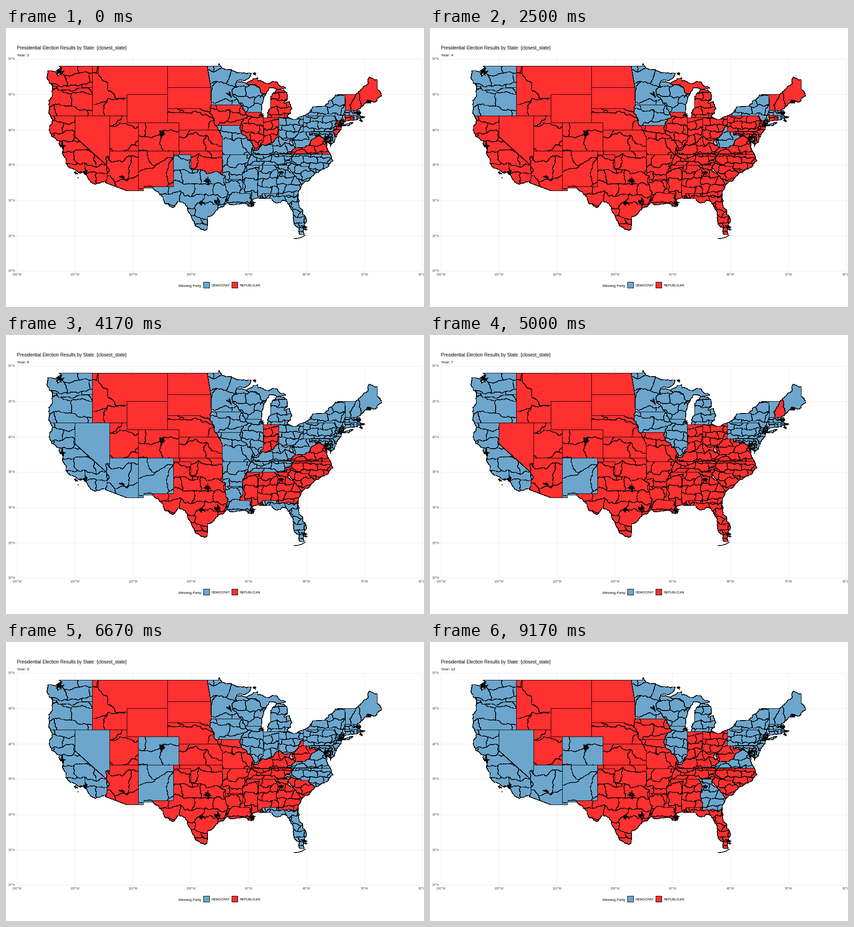
A matplotlib script for the animation above (10 s loop, 917 px wide and 611 px high).

```python
import math
import random

import matplotlib.pyplot as plt
import numpy as np
from matplotlib.animation import FuncAnimation
from matplotlib.patches import Polygon, Rectangle

W, H, DPI = 917, 611, 100
BLUE, RED = "#6CA6CD", "#FF3030"
LOOP_MS, FRAMES = 10000, 200
PX = 72 / DPI
INK = dict(color="black", lw=0.5 * PX, antialiased=False)

plt.rcParams["font.family"] = "Liberation Sans"
plt.rcParams["path.snap"] = False
fig = plt.figure(figsize=(W / DPI, H / DPI), dpi=DPI, facecolor="white")
ax = fig.add_axes([0, 0, 1, 1])
ax.set_xlim(-0.5, W - 0.5)
ax.set_ylim(H - 0.5, -0.5)
ax.axis("off")

# Blue states of the first election, then the states that change sides at each later one
SWINGS = (
    "MN WI MO AR LA TX MS AL GA FL SC NC TN KY WV OH PA NY MA RI MD DE",
    "WI MO AR LA TX MS AL FL SC NC TN KY OH PA MA DE",
    "NY GA WV MD RI",
    "WA OR IA WI NY MA RI WV",
    "CA NV MT CO NM MO AR LA IL MI OH KY TN GA PA NJ CT VT NH ME MD DE",
    "MT CO GA AZ FL",
    "NV AZ MO AR LA OH KY TN FL WV NH",
    "NM IA NH",
    "NV CO NM IA IN OH VA NC FL",
    "IN NC",
    "IA WI MI OH PA FL",
    "AZ GA MI PA WI")
blue_by_year = [set()]
for swing in SWINGS:
    blue_by_year.append(blue_by_year[-1] ^ set(swing.split()))
blue_by_year.pop(0)


def text(x, y, s, px, color="black", **kw):
    return ax.text(x, y, s, fontsize=px * PX, color=color, **kw)


def split(a, b, rng):
    """Midpoint displacement between two points, without the end point."""
    dx, dy = b[0] - a[0], b[1] - a[1]
    if math.hypot(dx, dy) < 3:
        return [a]
    k = rng.uniform(-0.2, 0.2)
    mid = ((a[0] + b[0]) / 2 - k * dy, (a[1] + b[1]) / 2 + k * dx)
    return split(a, mid, rng) + split(mid, b, rng)


def edge(a, b):
    """Surveyed borders stay straight; the rest are rough, alike from both sides."""
    dx, dy = abs(b[0] - a[0]), abs(b[1] - a[1])
    if min(dx, dy) <= 1 or math.hypot(dx, dy) > 45:
        return [a]
    lo, hi = sorted((a, b))
    pts = split(lo, hi, random.Random(f"{lo}{hi}")) + [hi]
    return pts[:-1] if a == lo else pts[:0:-1]


states = []


def state(name, step, *coords):
    """Add a state over its neighbours; step is the spacing of its districts."""
    pts = list(zip(coords[::2], coords[1::2]))
    outline = [p for a, b in zip(pts, pts[1:] + pts[:1]) for p in edge(a, b)]
    patch = Polygon(outline, facecolor=RED, edgecolor="black", lw=INK["lw"],
                    antialiased=False, zorder=1)
    ax.add_patch(patch)
    states.append((name, step, patch))


def box(name, step, x0, y0, x1, y1):
    state(name, step, x0, y0, x1, y0, x1, y1, x0, y1)


def districts(index):
    """Brick-like net of rough lines over the visible part of a state."""
    name, step, patch = states[index]
    rng = random.Random(name)
    extent = patch.get_path().get_extents()
    cols, rows = int(extent.width / step) + 3, int(extent.height / step) + 3
    nodes = {(i, j): (extent.x0 + (i - 0.6 + rng.uniform(-0.3, 0.3)) * step,
                      extent.y0 + (j - 0.6 + rng.uniform(-0.3, 0.3)) * step)
             for i in range(cols) for j in range(rows)}
    net = []
    for (i, j), p in nodes.items():
        for q in [(i + 1, j), (i, j + 1)][:1 + (i + j) % 2]:
            if q in nodes:
                net += split(p, nodes[q], rng) + [nodes[q], (np.nan, np.nan)]
    net = np.array(net)
    visible = patch.get_path().contains_points(net)
    for _, _, cover in states[index + 1:]:
        visible &= ~cover.get_path().contains_points(net)
    net[~visible] = np.nan
    ax.plot(*net.T, zorder=2, **INK)


def scribble(x, y, r):
    """Tangle of tiny city districts or islets."""
    rng = random.Random(f"{x} {y}")
    pts = [(x + rng.gauss(0, r / 2), y + rng.gauss(0, r / 2)) for _ in range(4 + 2 * r)]
    ax.plot(*zip(*pts), zorder=3, **INK)


for k in range(8):
    x = 24 + 127 * k
    ax.plot([x, x], [68, 532], color="#EBEBEB", lw=0.5 * PX, antialiased=False, zorder=0)
    text(x, 539.5, f"{130 - 10 * k}°W", 7, "#4D4D4D", ha="center", va="center")
for k in range(7):
    y = round(68 + 77.4 * k)
    ax.plot([24, 913], [y, y], color="#EBEBEB", lw=0.5 * PX, antialiased=False, zorder=0)
    text(20, y + 0.5, f"{50 - 5 * k}°N", 7, "#4D4D4D", ha="right", va="center")

# Later states cover earlier ones, so a shared border is shaped by the later one.
# West
box("MT", 0, 189, 83, 354, 156)
state("CA", 24, 97,192, 101,200, 95,216, 104,239, 119,258, 127,280, 143,307, 166,316, 175,320,
      188,338, 218,336, 240,320, 227,192)
state("WA", 29, 116,83, 189,83, 189,140, 101,140, 101,127, 91,93, 112,97, 113,106, 119,100)
state("OR", 36, 189,130, 160,131, 136,135, 115,136, 110,127, 101,127, 99,152, 94,182, 97,192, 189,192)
state("ID", 60, 189,83, 202,83, 202,100, 223,120, 222,136, 240,154, 265,153, 265,192, 189,192)
box("UT", 50, 227, 192, 290, 269)
box("WY", 0, 265, 145, 354, 207)
box("CO", 45, 290, 207, 379, 269)
state("NV", 0, 151,192, 227,192, 227,281, 218,283, 220,300, 151,238)
state("AZ", 40, 227,269, 290,269, 290,356, 265,356, 217,338, 221,331, 221,318, 226,311,
      220,300, 218,283, 227,281)
state("NM", 55, 290,269, 367,269, 367,347, 322,347, 322,350, 301,350, 301,356, 290,356)

# Plains and Mississippi
box("ND", 0, 354, 83, 452, 130)
box("SD", 0, 354, 130, 460, 186)
state("NE", 60, 354,176, 424,176, 449,185, 470,223, 379,223, 379,207, 354,207)
box("KS", 48, 379, 223, 480, 269)
state("TX", 25, 367,277, 470,277, 492,345, 483,382, 465,394, 442,412, 441,440, 416,433, 401,404,
      387,381, 376,379, 365,393, 348,384, 343,368, 322,347, 367,347)
state("OK", 34, 367,269, 474,269, 475,322, 440,319, 405,306, 405,277, 367,277)
state("MN", 34, 441,83, 466,83, 467,77, 473,87, 514,97, 538,99, 505,118, 530,130, 530,168,
      450,168, 449,130)
state("IA", 31, 450,168, 530,168, 535,213, 459,213, 454,196, 447,173)
state("MO", 26, 459,213, 535,213, 545,262, 545,277, 536,285, 527,285, 531,277, 474,277, 474,238, 465,223)
state("AR", 31, 474,277, 531,277, 527,285, 545,285, 535,331, 481,331, 481,324, 475,322)
state("LA", 22, 481,331, 535,331, 535,362, 538,374, 543,390, 509,385, 483,382, 487,359, 481,347)

# South
state("TN", 15, 538,277, 637,275, 620,300, 528,300)
state("MS", 24, 528,300, 560,300, 560,360, 552,372, 538,374, 535,362, 512,362, 519,343, 518,317)
state("AL", 20, 555,300, 600,300, 600,362, 562,362, 564,373, 552,372, 551,348)
state("FL", 15, 562,362, 640,362, 642,380, 651,402, 658,425, 653,452, 645,452, 631,424, 625,396,
      607,376, 593,383, 583,373, 564,373)
state("SC", 17, 617,290, 665,295, 677,318, 669,328, 647,346, 630,330, 610,303)
state("GA", 17, 588,300, 620,300, 617,306, 633,323, 647,346, 641,362, 632,372, 597,367, 593,332)
state("NC", 14, 637,275, 711,276, 717,290, 703,305, 677,318, 663,303, 648,303, 630,297, 604,300, 620,288)
state("KY", 18, 540,262, 564,245, 598,230, 620,240, 634,262, 612,275, 538,277)

# Great Lakes
state("WI", 22, 505,118, 527,121, 557,133, 562,144, 557,152, 570,141, 561,165, 560,184, 524,184,
      517,168, 497,149, 495,136)
state("MI", 0, 527,121, 552,108, 552,116, 576,122, 595,118, 613,130, 576,132, 562,144, 557,133)
state("MI", 16, 573,196, 580,176, 580,151, 599,134, 616,142, 617,155, 609,164, 621,160, 627,176, 616,196)
state("IL", 18, 524,184, 560,184, 564,196, 564,247, 551,267, 543,269, 529,245, 514,224, 518,204, 529,195)
state("IN", 17, 564,196, 598,196, 598,237, 587,249, 557,257, 564,247)
state("OH", 14, 598,196, 637,199, 652,192, 652,213, 640,245, 617,244, 598,237)

# Northeast
state("WV", 24, 652,213, 652,227, 665,227, 666,235, 687,233, 673,242, 655,261, 634,262, 626,247, 637,235)
state("VA", 15, 612,275, 711,276, 704,254, 696,240, 687,233, 673,242, 655,261, 634,262)
state("MD", 10, 665,227, 715,227, 720,248, 711,260, 707,233, 704,254, 696,240, 687,233, 666,235)
state("DE", 0, 712,227, 717,226, 721,247, 714,247)
state("PA", 13, 652,192, 662,187, 662,192, 718,192, 726,202, 721,210, 725,219, 717,226, 652,227)
state("NY", 17, 662,187, 673,172, 699,171, 722,146, 743,145, 744,180, 741,206, 736,213, 726,202,
      718,192, 662,192)
state("NY", 0, 735,214, 748,213, 761,206, 748,209)
state("VT", 0, 743,145, 770,145, 765,180, 744,180)
state("NH", 0, 767,145, 772,141, 777,175, 769,181, 755,180, 760,159)
state("ME", 0, 772,141, 781,133, 796,107, 814,113, 814,134, 824,148, 788,164, 777,175)
state("MA", 10, 744,180, 776,180, 773,187, 787,195, 771,199, 763,191, 742,191)
state("CT", 11, 742,191, 763,191, 762,202, 740,207)
state("RI", 0, 763,191, 769,191, 771,199, 762,202)
state("NJ", 9, 726,202, 736,207, 735,221, 724,239, 717,226, 725,219, 721,210)

for index, (_, step, _) in enumerate(states):
    if step:
        districts(index)

for spot in ((117, 97, 9), (123, 257, 7), (173, 316, 7), (254, 325, 6), (341, 229, 8), (441, 335, 8),
             (428, 383, 6), (464, 381, 7), (490, 145, 6), (561, 191, 5), (537, 384, 8), (604, 315, 6),
             (655, 438, 6), (706, 243, 10), (735, 210, 8), (773, 186, 7), (795, 161, 5),
             (152, 316, 3), (157, 327, 1), (545, 99, 4), (779, 202, 4)):
    scribble(*spot)
ax.plot([631, 640, 648, 656], [461, 460, 458, 453], zorder=3, **INK)

text(23.5, 46.6, "Presidential Election Results by State: {closest_state}", 10.15)
year_label = text(23.5, 61.8, "", 8.45)
text(378, 566.6, "Winning Party", 8.1)
for x, color, party in ((433, BLUE, "DEMOCRAT"), (495, RED, "REPUBLICAN")):
    ax.add_patch(Rectangle((x, 556), 13, 13, facecolor=color, edgecolor="black",
                           lw=INK["lw"], antialiased=False))
    text(x + 17, 566, party, 7.1)


def update(i):
    # A step that contains a change of year already shows the new year
    year = (len(SWINGS) * (i + 1) - 1) // FRAMES
    for name, _, patch in states:
        patch.set_facecolor(BLUE if name in blue_by_year[year] else RED)
    year_label.set_text(f"Year: {year + 1}")
    return [year_label] + [patch for _, _, patch in states]


anim = FuncAnimation(fig, update, frames=FRAMES, interval=LOOP_MS // FRAMES,
                     repeat=True, repeat_delay=0)
plt.show()
```
